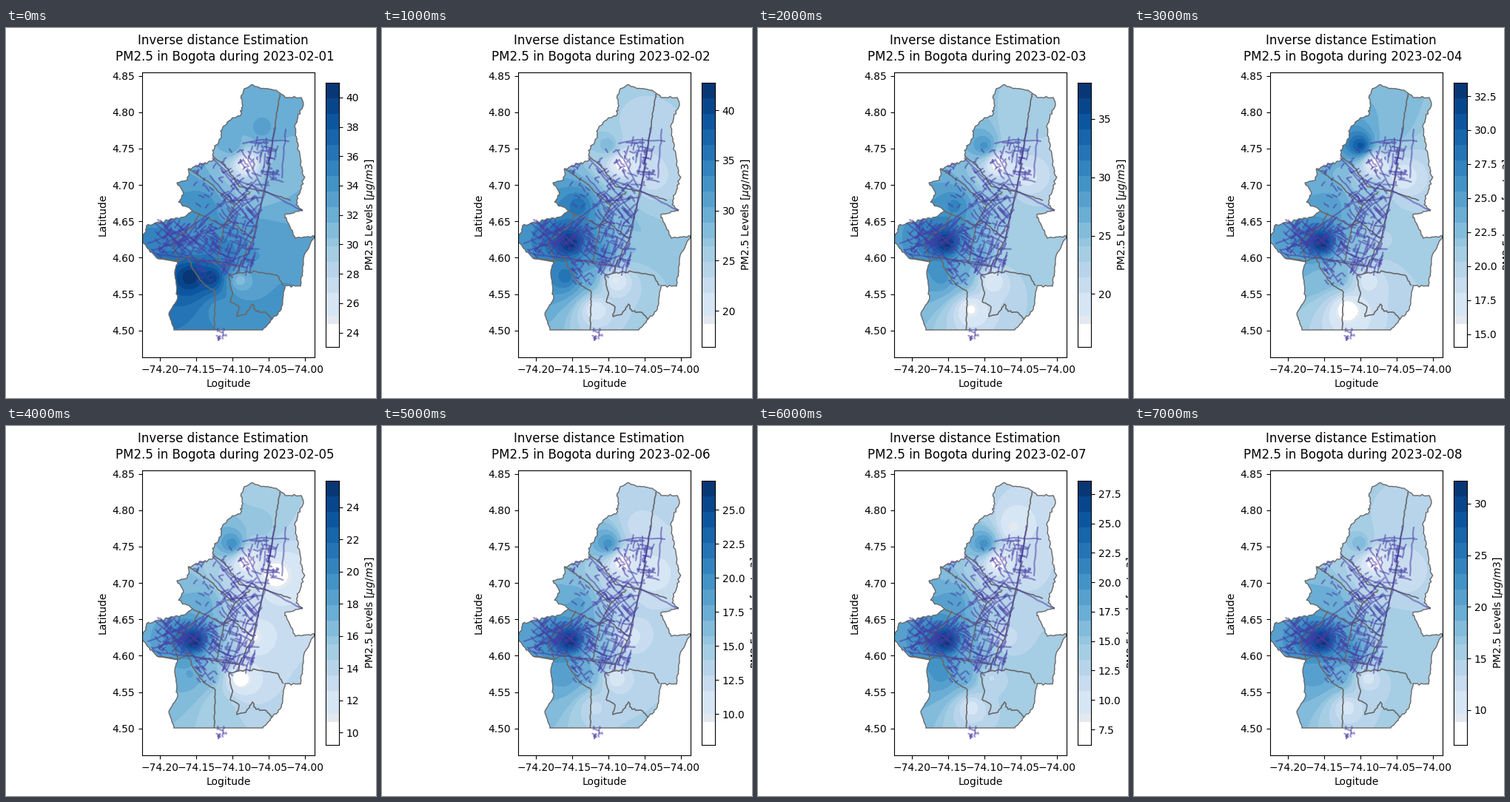
A matplotlib script that plays this animation: 500 px wide and 500 px high, repeating every 8 s.

```python
import numpy as np
import matplotlib.pyplot as plt
from matplotlib.animation import FuncAnimation
from matplotlib.collections import LineCollection
from matplotlib.colors import ListedColormap
from matplotlib.patches import Polygon

SIZE = 500
LEFT, RIGHT, TOP, BOTTOM = 184, 417, 60, 445
GREY, ROAD = "#696969", "#463ca4"
rng = np.random.default_rng(12)
plt.rcParams["font.family"] = "DejaVu Sans"


def box(x0, y0, x1, y1):
    """Axes rectangle from pixel corners, y measured downwards."""
    return [x0 / SIZE, 1 - y1 / SIZE, (x1 - x0) / SIZE, (y1 - y0) / SIZE]


def rough(points, amp, step=3):
    """Refine a polyline and shake the points between its corners."""
    p = np.array(points, float)
    parts = [p[:1]]
    for a, b in zip(p, p[1:]):
        n = max(1, round(np.hypot(*(b - a)) / step))
        t = np.arange(1, n + 1)[:, None] / n
        parts.append(a + (b - a) * t + rng.normal(0, amp, (n, 2)) * (t < 1))
    return np.vstack(parts)


# City outline, in pixels of the stage
EAST = [(322, 82), (331, 77), (362, 84), (380, 94), (399, 94), (402, 104),
        (391, 130), (391, 145), (397, 170), (402, 205), (392, 239),
        (401, 246), (377, 252), (384, 269), (391, 284), (417, 281)]
SOUTH_EAST = [(417, 281), (403, 307), (398, 349), (377, 348), (372, 380),
              (347, 408)]
SOUTH_WEST = [(227, 408), (220, 386), (232, 365), (228, 330), (232, 316)]
WEST = [(197, 303), (184, 288), (190, 267), (228, 258), (242, 255),
        (252, 247), (233, 235), (240, 225), (231, 209), (245, 205),
        (247, 190), (278, 180), (279, 165), (291, 148), (290, 139),
        (302, 125), (316, 119), (320, 105), (318, 91), (322, 82)]
outline = np.vstack([rough(EAST, .8), rough(SOUTH_EAST, .6),
                     rough(SOUTH_WEST, .5), [(204, 311)], rough(WEST, 1.1)])

DISTRICTS = [
    [(370, 89), (352, 206), (334, 285), (315, 322)],
    [(247, 190), (275, 209), (309, 240), (330, 221)],
    [(279, 173), (300, 190), (315, 214), (349, 221), (385, 233)],
    [(252, 247), (283, 262), (294, 269), (309, 240)],
    [(262, 250), (252, 268), (225, 288), (232, 315)],
    [(204, 311), (232, 315), (246, 309), (285, 318), (315, 322)],
    [(334, 285), (305, 261), (294, 269), (284, 318)],
    [(246, 309), (252, 325), (266, 345), (283, 357), (281, 408)],
    [(315, 322), (314, 331), (337, 329), (366, 334), (375, 348)],
    [(314, 331), (301, 335), (306, 360), (303, 370), (315, 377), (312, 390),
     (324, 387), (333, 373), (338, 383), (352, 385), (360, 394)],
]

AVENUES = [
    [(364, 135), (350, 215), (334, 290), (318, 322)],
    [(378, 137), (373, 202)],
    [(320, 156), (345, 151), (382, 153)],
    [(333, 160), (327, 178), (346, 215)],
    [(279, 176), (306, 203), (349, 220), (400, 247)],
    [(276, 200), (334, 264)],
    [(290, 190), (340, 252)],
    [(192, 291), (250, 268), (296, 236), (346, 229)],
    [(199, 300), (290, 270), (318, 243)],
    [(205, 306), (300, 317), (326, 306)],
    [(206, 268), (247, 301), (276, 343)],
    [(228, 262), (306, 337)],
    [(336, 266), (296, 333)],
]

# x0, y0, x1, y1, street direction in degrees, count, longest street
ZONES = [
    (332, 152, 368, 212, 98, 40, 20),
    (284, 158, 330, 206, 55, 22, 12),
    (288, 206, 342, 262, 50, 44, 22),
    (252, 182, 288, 242, 35, 18, 9),
    (202, 262, 286, 306, 40, 110, 20),
    (290, 262, 336, 326, 108, 58, 20),
    (256, 312, 284, 346, 50, 22, 9),
    (284, 408, 297, 421, 100, 9, 6),
]


def streets(x0, y0, x1, y1, angle, count, longest):
    """Short streets along two crossing directions."""
    for _ in range(count):
        start = rng.uniform((x0, y0), (x1, y1))
        turn = np.radians(angle + 90 * rng.integers(2) + rng.normal(0, 5))
        reach = np.linspace(-.5, .5, 4)[:, None] * rng.uniform(3, longest)
        line = start + reach * [np.cos(turn), np.sin(turn)]
        yield line + rng.normal(0, .5, line.shape)


roads = [rough(a, .5, 8) for a in AVENUES]
roads += [s for zone in ZONES for s in streets(*zone)]

# Measuring stations and their levels on the key days
STATIONS = np.array([
    (344, 136), (305, 159), (324, 184), (362, 201), (322, 222), (266, 240),
    (254, 290), (249, 336), (277, 337), (315, 341), (288, 380), (291, 305),
    (334, 285)])
KEY_LEVELS = {
    0: [33, 32.5, 23.02, 31.5, 30, 34.5, 34, 41, 40, 31, 34, 35.5, 33.5],
    1: [24, 28, 16.4, 22, 27, 36, 42.73, 36, 30, 19, 20, 33, 27],
    3: [23, 30.5, 14.5, 16.5, 22, 25, 33.48, 23, 23, 17, 14.05, 22, 20],
    4: [16, 19.5, 9.3, 9.3, 13.5, 17.5, 25.65, 18, 16.5, 9.24, 15, 16, 10.5],
    6: [8.5, 20, 6.18, 11.5, 12.5, 19, 28.63, 20, 18, 12, 10, 17, 11],
    7: [14.5, 18, 6.63, 12, 14, 20, 32.22, 21, 20, 11, 11, 23, 15],
}


def levels(day):
    """Levels of the day, or the mean of its neighbours."""
    if day in KEY_LEVELS:
        return np.array(KEY_LEVELS[day])
    return (levels(day - 1) + levels(day + 1)) / 2


gx, gy = np.meshgrid(np.arange(LEFT, RIGHT) + .5, np.arange(TOP, BOTTOM) + .5)
dist2 = (gx[..., None] - STATIONS[:, 0])**2 + (gy[..., None] - STATIONS[:, 1])**2
weights = 1 / (dist2 + 1)
weights /= weights.sum(axis=-1, keepdims=True) if False else weights.sum(
    axis=-1)[..., None]

# Colour bands: pale ones first, then even steps of the blue scale
steps = [3, 1, 3, 2, 2, 2, 1] + [2] * 10
ends = np.cumsum(steps)
mids = (ends - np.array(steps) / 2) / ends[-1]
shades = [plt.cm.Blues(m) for m in mids]
shades[0], shades[1] = (1, 1, 1, 1), (.89, .915, .945, 1)
bands = ListedColormap([c for c, n in zip(shades, steps) for _ in range(n)])

fig = plt.figure(figsize=(5, 5), dpi=100)
ax = fig.add_axes(box(LEFT, TOP, RIGHT, BOTTOM))
ax.set(xlim=(LEFT, RIGHT), ylim=(BOTTOM, TOP), xlabel="Logitude",
       ylabel="Latitude")
ax.set_xticks([208 + 49.1 * i for i in range(5)],
              [f"\u2212{74.2 - .05 * i:.2f}" for i in range(5)])
ax.set_yticks([408.7 - 49.17 * i for i in range(8)],
              [f"{4.5 + .05 * i:.2f}" for i in range(8)])

field = ax.imshow(np.zeros(gx.shape), cmap=bands, aspect="auto",
                  extent=(LEFT, RIGHT, BOTTOM, TOP), interpolation="nearest")
city = Polygon(outline, fc="none", ec=GREY, lw=1)
ax.add_patch(city)
field.set_clip_path(city)
ax.add_collection(LineCollection([rough(d, .5) for d in DISTRICTS],
                                 colors=GREY, linewidths=1.2))
ax.add_collection(LineCollection(roads, colors=ROAD, linewidths=1.6,
                                 alpha=.52, capstyle="round"))

cax = fig.add_axes(box(432, 74, 450, 431))
scale = cax.imshow(np.arange(ends[-1])[:, None], cmap=bands, aspect="auto",
                   origin="lower", interpolation="nearest")
cax.set_xticks([])
cax.yaxis.tick_right()
cax.yaxis.set_label_position("right")
cax.set_ylabel(r"PM2.5 Levels [$\mu g/m3$]")

fig.text(177.5 / SIZE, 1 - 22 / SIZE, "Inverse distance Estimation", size=12)
title = fig.text(147.5 / SIZE, 1 - 44 / SIZE, "", size=12)


def draw(day):
    values = levels(day)
    low, high = values.min(), values.max()
    field.set_data(weights @ values)
    field.set_clim(low, high)
    scale.set_extent((0, 1, low, high))
    cax.set_ylim(low, high)
    title.set_text(f"PM2.5 in Bogota during 2023-02-{day + 1:02d}")
    return field, scale, title


anim = FuncAnimation(fig, draw, frames=8, interval=1000, repeat=True)
plt.show()
```
